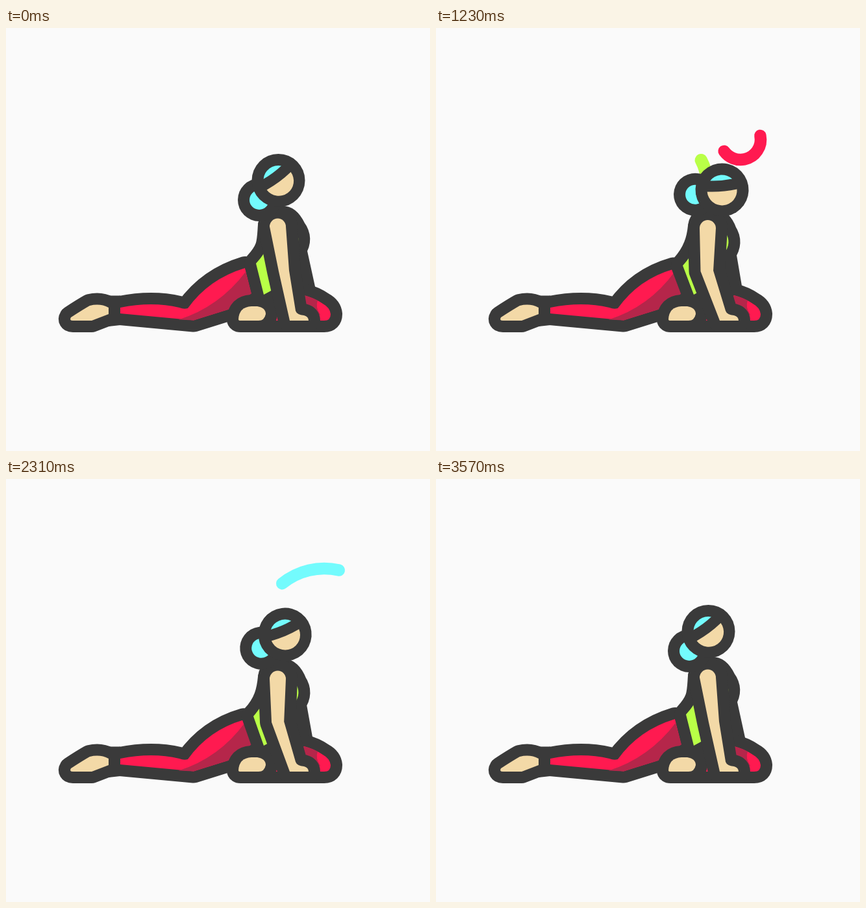
Recreate the animation shown at these times as an HTML page with a canvas. Size 653 by 652 pixels, loop 3.6 s.

```html
<!DOCTYPE html>
<html lang="en">
<head>
<meta charset="utf-8">
<title>Stretch</title>
<style>
html, body { margin: 0; width: 100%; height: 100%; overflow: hidden; background: #fafafa; }
canvas { display: block; }
</style>
</head>
<body>
<canvas id="stage" width="653" height="652"></canvas>
<script>
const ctx = document.getElementById('stage').getContext('2d');
const LOOP = 3600, STEP = 30, RAD = Math.PI / 180;
const DARK = '#3a3a3a', RED = '#ff1a50', WINE = '#b5264a', SKIN = '#f3d9a7',
      LIME = '#b9ff47', CYAN = '#73fbfd';

const clamp = v => Math.min(1, Math.max(0, v));
const smooth = v => (v = clamp(v), v * v * (3 - 2 * v));
// Eases from 0 up to 1 at the peak and back to 0.
const swing = (t, start, peak, end) =>
  smooth(t < peak ? (t - start) / (peak - start) : (end - t) / (end - peak));

const arc = (color, x, y, r, from, sweep, start, span) =>
  ({ color, x, y, r, from, sweep, start, span });
const ring = (color, r, from, sweep) => arc(color, 419, 238, r, from, sweep, 2600, 960);

const arcs = [
  arc(RED, 480, 250, 102, 100, -250, 30, 560),
  arc(LIME, 219, 238, 56, 30, 330, 100, 564),
  arc(LIME, 345, 238, 72, 180, 180, 690, 584),
  arc(RED, 469, 172, 31, -124, 384, 829, 700),
  arc(CYAN, 247, 178, 21, -215, 495, 1399, 700),
  arc(CYAN, 490, 240, 102, -150, 250, 2130, 560),
  ring(RED, 137, 128, 417),
  ring(LIME, 99.5, 145, 509),
  ring(CYAN, 61, -27, 510)
];

// The front runs ahead and the tail catches up; a short piece swells into a ball.
function drawArc({ color, x, y, r, from, sweep, start, span }, t) {
  const k = (t - start) / span;
  if (k <= 0 || k >= 1) return;
  const lead = smooth(k / .9), tail = k ** 2.2;
  if (lead <= tail) return;
  const length = r * Math.abs(sweep) * RAD * (lead - tail);
  ctx.beginPath();
  ctx.arc(x, y, r, (from + sweep * tail) * RAD, (from + sweep * lead) * RAD, sweep < 0);
  ctx.strokeStyle = color;
  ctx.lineWidth = 18.5 + 12 * Math.exp(-length / 14);
  ctx.stroke();
}

function fill(d, color) {
  ctx.fillStyle = color;
  ctx.fill(new Path2D(d));
}

function outlined(d, color) {
  ctx.strokeStyle = DARK;
  ctx.lineWidth = 36;
  ctx.stroke(new Path2D(d));
  fill(d, color);
}

function disc(x, y, r, color) {
  ctx.beginPath();
  ctx.arc(x, y, r, 0, 2 * Math.PI);
  ctx.fillStyle = color;
  ctx.fill();
}

function drawBackLeg(mix) {
  const hip = `${mix(368, 365)} ${mix(370, 372)}`;
  outlined('M100 446Q97 451 103 451H132L158 441V431Q145 424 129 428Q120 433 100 446Z', SKIN);
  outlined(`M176 431Q225 421 267 431Q274 434 280 432Q312 387 ${hip}L378 409L345 433L289 450.5L176 440Z`, RED);
  fill(`M266 449.5Q328 430 ${mix(369, 367)} 376L378 409L345 433L289 450.5Z`, WINE);
  fill('M158 412.5H176V458L158 460Z', DARK);
}

function drawTorso(mix) {
  outlined(`M406 ${mix(304, 306)}
    C404 ${mix(330, 325)} ${mix(406, 397)} ${mix(340, 347)} ${mix(385, 379)} ${mix(363, 367)}
    L397 411L412 403L${mix(459, 453)} 405L${mix(445, 444)} ${mix(341, 348)}
    Q456 ${mix(325, 332)} ${mix(444, 446)} ${mix(309, 316)}
    Q${mix(436, 440)} ${mix(292, 298)} 425 ${mix(292, 294)}
    Q408 292 406 ${mix(304, 306)}Z`, LIME);
  fill('M436 348H460V412H430Z', DARK);
}

function drawFrontLeg() {
  fill('M398 411L412 403H460V469H380V440Z', DARK);
  outlined('M416 451H490Q500 451 500 441Q499 431 488 425Q475 416 459 412L440 428L418 441Z', RED);
  fill('M452 418L459 412Q470 415 480 420Q476 430 484 442L455 446Z', WINE);
  outlined('M358 449Q359 430 378 429H387Q400 431 400 441Q398 451 389 451H361Q358 451 358 449Z', SKIN);
}

function drawArm(sink) {
  const bend = sink ** .6, top = 306 + 3 * sink;
  const left = 420 - 14 * bend, right = 436 - 10 * bend;
  outlined(`M406 ${top}A12.5 12.5 0 0 1 431 ${top}L${right} 374
    L446 436Q448 442 459 443Q466 445 466 451H437L${left} 375Z`, SKIN);
}

function drawHead(turn) {
  ctx.save();
  ctx.translate(407.5, 275);
  ctx.rotate(turn * 36 * RAD);
  disc(-17.5, -10, 33, DARK);
  disc(-17.5, -10, 15, CYAN);
  disc(12, -40, 41, DARK);
  ctx.translate(12, -40);
  ctx.rotate((-36.5 - 4 * turn) * RAD);
  fill('M-23 1A23 23 0 0 0 23 1Q0 4 -23 1Z', SKIN);
  fill('M-17 -15.5A23 23 0 0 1 17 -15.5Q0 -13.5 -17 -15.5Z', CYAN);
  ctx.restore();
}

function draw(t) {
  const turn = swing(t, 0, 1320, 3120);
  const sink = swing(t, 60, 1650, 3350);
  const mix = (a, b) => a + (b - a) * sink;
  ctx.fillStyle = '#fafafa';
  ctx.fillRect(0, 0, 653, 652);
  ctx.lineCap = ctx.lineJoin = 'round';
  arcs.forEach(a => drawArc(a, t));
  drawBackLeg(mix);
  drawTorso(mix);
  drawFrontLeg();
  drawArm(sink);
  drawHead(turn);
}

function frame() {
  draw(Math.floor(performance.now() % LOOP / STEP) * STEP);
  requestAnimationFrame(frame);
}
frame();
</script>
</body>
</html>
```
